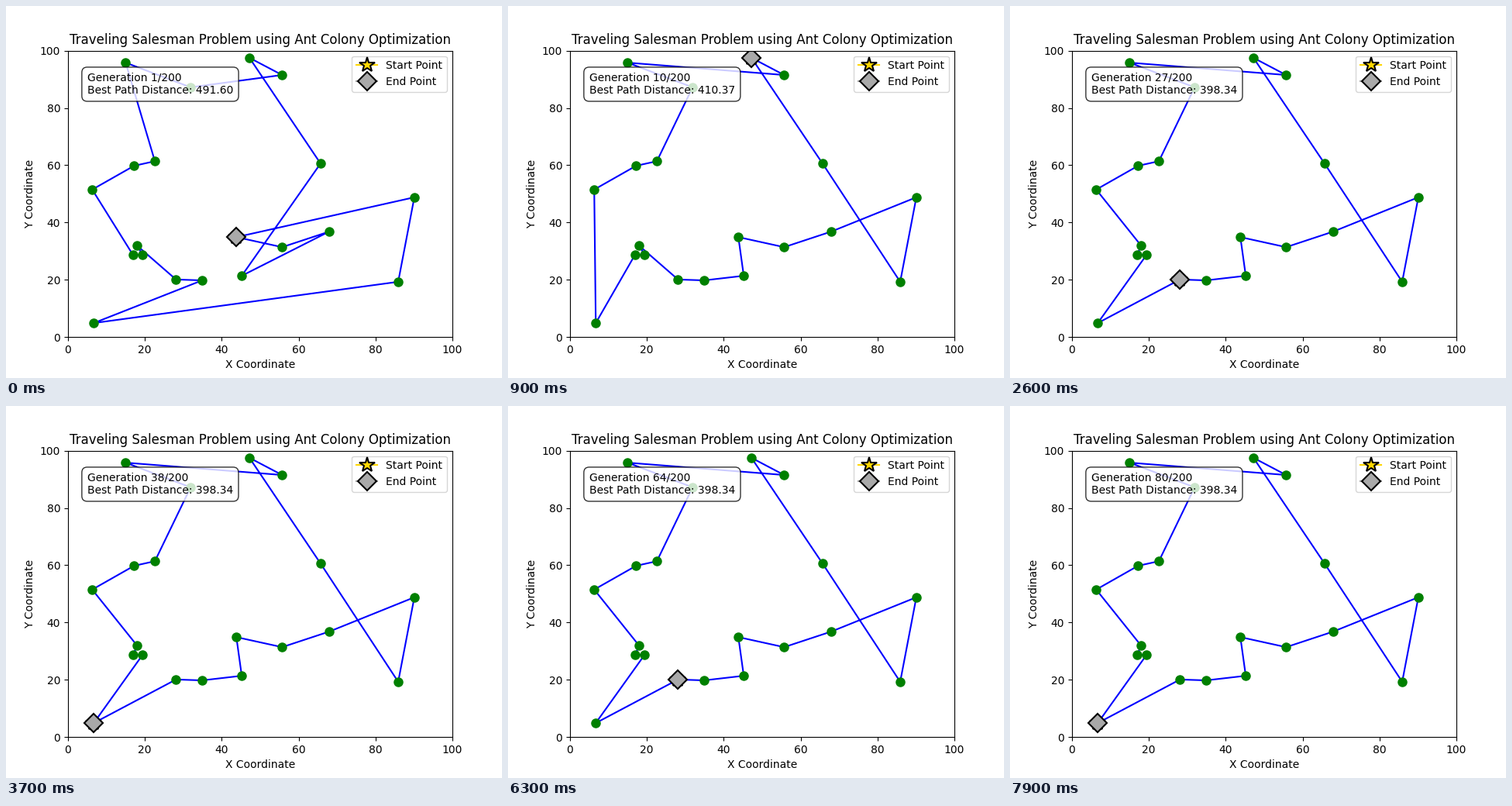
A matplotlib script for the animation above (8 s loop, 640 by 480 pixels).

```python
import matplotlib.pyplot as plt
from matplotlib.animation import FuncAnimation

FRAMES = 80
INTERVAL = 100

CITIES = {
    "A": (15.0, 95.8), "B": (31.9, 87.2), "C": (47.2, 97.5), "D": (55.7, 91.5),
    "E": (22.6, 61.4), "F": (17.2, 59.8), "G": (6.3, 51.5), "H": (65.7, 60.6),
    "I": (90.1, 48.8), "J": (43.8, 34.9), "K": (55.7, 31.4), "L": (67.9, 36.8),
    "M": (85.9, 19.3), "N": (45.2, 21.4), "O": (34.9, 19.8), "P": (28.1, 20.1),
    "Q": (19.4, 28.7), "R": (16.9, 28.7), "S": (18.0, 31.9), "T": (6.7, 4.9),
}

# Closed tours with their lengths
FIRST = ("JKLNHCDBAEFGRQSPOTMI", 491.60)
EARLY = ("TRQSPONJKLIMHCDABFEG", 419.11)
CROSSED = ("CDABEFGTRQSPONJKLIMH", 410.37)
OUTER = ("DABFEGTRSQPNOJKLMIHC", 412.09)
BEST = ("PONJKLIMHCDABEFGSRQT", 398.34)

# (first generation, tour, start city)
SCHEDULE = [
    (1, FIRST, "J"), (4, EARLY, "T"), (7, CROSSED, "C"), (14, OUTER, "D"),
    (18, CROSSED, "T"), (21, BEST, "P"), (33, BEST, "T"), (42, BEST, "P"),
    (48, BEST, "T"), (53, BEST, "P"), (68, BEST, "T"), (71, BEST, "P"),
    (76, BEST, "T"),
]


def state(generation):
    """Return the closed route, and its length, shown in a generation."""
    _, (tour, length), start = [s for s in SCHEDULE if s[0] <= generation][-1]
    i = tour.index(start)
    return tour[i:] + tour[:i] + start, length


fig, ax = plt.subplots(figsize=(6.4, 4.8), dpi=100)
ax.set(xlim=(0, 100), ylim=(0, 100),
       xlabel="X Coordinate", ylabel="Y Coordinate",
       title="Traveling Salesman Problem using Ant Colony Optimization")

path, = ax.plot([], [], "b-", lw=1.5)
ax.plot(*zip(*CITIES.values()), "go", ms=8)
edge = dict(mec="black", mew=1.5)
start_mark, = ax.plot([], [], marker="*", color="gold", ms=15,
                      label="Start Point", **edge)
end_mark, = ax.plot([], [], marker="D", color="darkgray", ms=12,
                    label="End Point", **edge)
info = ax.text(0.05, 0.85, "", transform=ax.transAxes, fontsize=10,
               bbox=dict(boxstyle="round,pad=0.5", facecolor="white", alpha=0.8))
ax.legend(loc="upper right")


def update(frame):
    generation = frame + 1
    route, length = state(generation)
    xs, ys = zip(*(CITIES[c] for c in route))
    path.set_data(xs, ys)
    start_mark.set_data(xs[:1], ys[:1])
    end_mark.set_data(xs[-1:], ys[-1:])
    info.set_text(f"Generation {generation}/200\n"
                  f"Best Path Distance: {length:.2f}")
    return path, start_mark, end_mark, info


anim = FuncAnimation(fig, update, frames=FRAMES, interval=INTERVAL,
                     repeat=True, repeat_delay=0)
plt.show()
```
